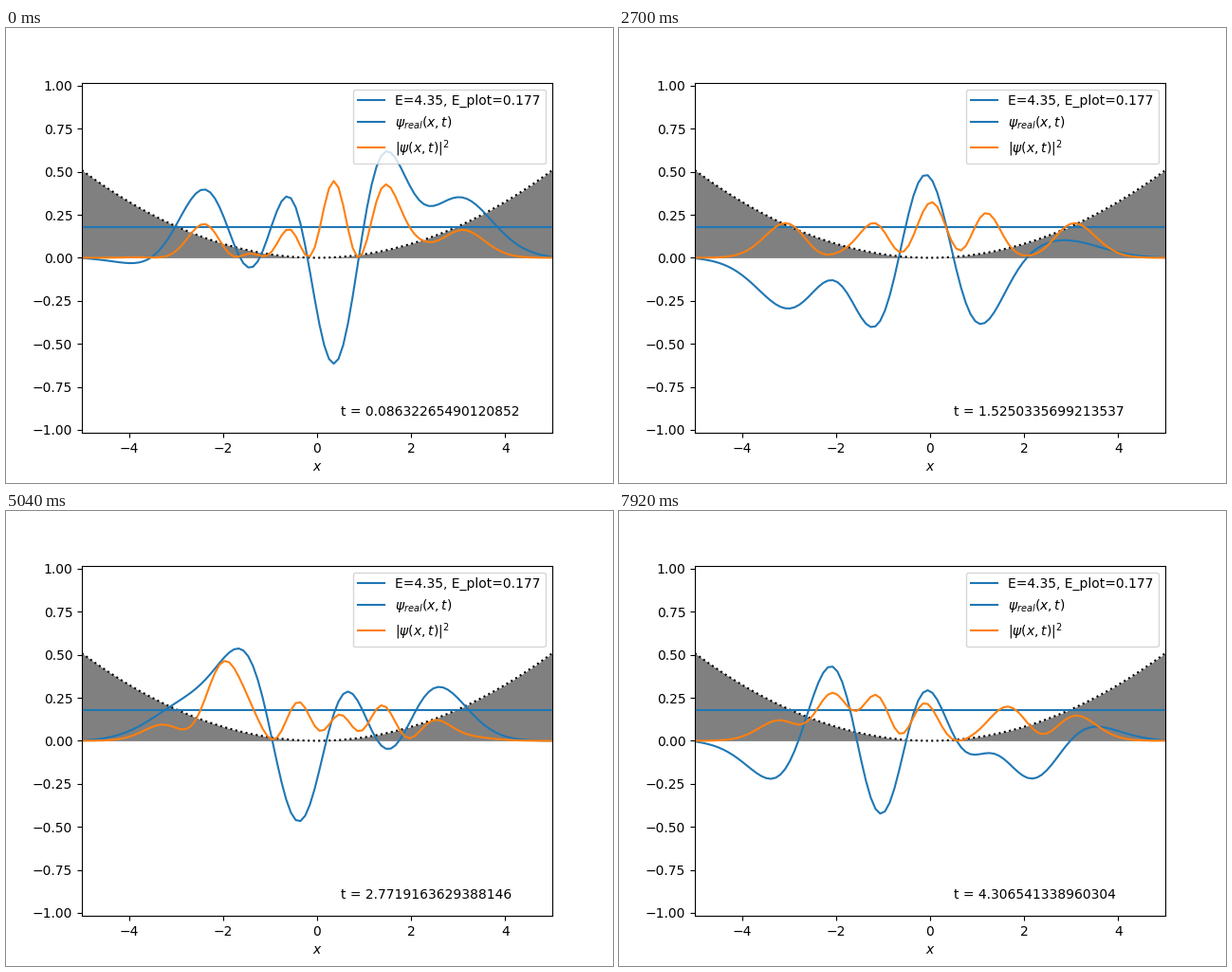
Animation of 640 by 480 pixels, one loop 8 s. Source, as a matplotlib script:

```python
import numpy as np
import matplotlib.pyplot as plt
from matplotlib.animation import FuncAnimation

INTERVAL = 40        # ms per drawn frame
HOLD = 180           # ms each pose stays on screen
LOOP = 8000
DT = 0.00959140610013428
STEPS_PER_POSE = 10
V_SCALE = 0.04072    # potential and energy are shrunk to share the axis


def eigenstates(x):
    """Energies and normalised states of a harmonic well on a finite grid."""
    dx = x[1] - x[0]
    hop = np.full(len(x) - 1, -0.5 / dx**2)
    hamiltonian = np.diag(1 / dx**2 + 0.5 * x**2) + np.diag(hop, 1) + np.diag(hop, -1)
    energies, states = np.linalg.eigh(hamiltonian)
    return energies, states * np.sign(states[-1]) / np.sqrt(dx)


def pose_times(count):
    """Clock value of each pose, summed in small steps."""
    times, t = [], 0.0
    for step in range(1, count * STEPS_PER_POSE):
        t += DT
        if step % STEPS_PER_POSE == STEPS_PER_POSE - 1:
            times.append(t)
    return times


x = np.linspace(-5, 5, 100)
energies, states = eigenstates(x)
energies, states = energies[2:8], states[:, 2:8]
weights = np.array([1, 0.6, 0.4, -0.5, 0.4, 0.7])
weights /= np.linalg.norm(weights)
mean_energy = np.sum(weights**2 * energies)
times = pose_times(-(-LOOP // HOLD))


def psi(t):
    return states @ (weights * np.exp(-1j * energies * t))


plt.rcParams["font.family"] = "DejaVu Sans"
fig, ax = plt.subplots(figsize=(6.4, 4.8), dpi=100)
potential = V_SCALE * 0.5 * x**2
ax.fill_between(x, 0, potential, color="gray", linewidth=0)
ax.plot(x, potential, ":", color="black")
ax.axhline(V_SCALE * mean_energy, color="C0",
           label=f"E={mean_energy:.2f}, E_plot={V_SCALE * mean_energy:.3f}")
real_line, = ax.plot([], [], color="C0", label=r"$\psi_{real}(x,t)$")
density_line, = ax.plot([], [], color="C1", label=r"$|\psi(x,t)|^2$")
clock = ax.text(0.5, -0.92, "")
ax.set_xlim(-5, 5)
ax.set_ylim(-2 * potential.max(), 2 * potential.max())
ax.set_xlabel("$x$")
ax.legend(loc="upper right")


def update(frame):
    pose = int((frame + 0.5) * INTERVAL) // HOLD
    t = times[pose]
    wave = psi(t)
    real_line.set_data(x, wave.real)
    density_line.set_data(x, np.abs(wave)**2)
    clock.set_text(f"t = {t}")
    return real_line, density_line, clock


animation = FuncAnimation(fig, update, frames=LOOP // INTERVAL,
                          interval=INTERVAL, repeat=True, repeat_delay=0)
plt.show()
```
